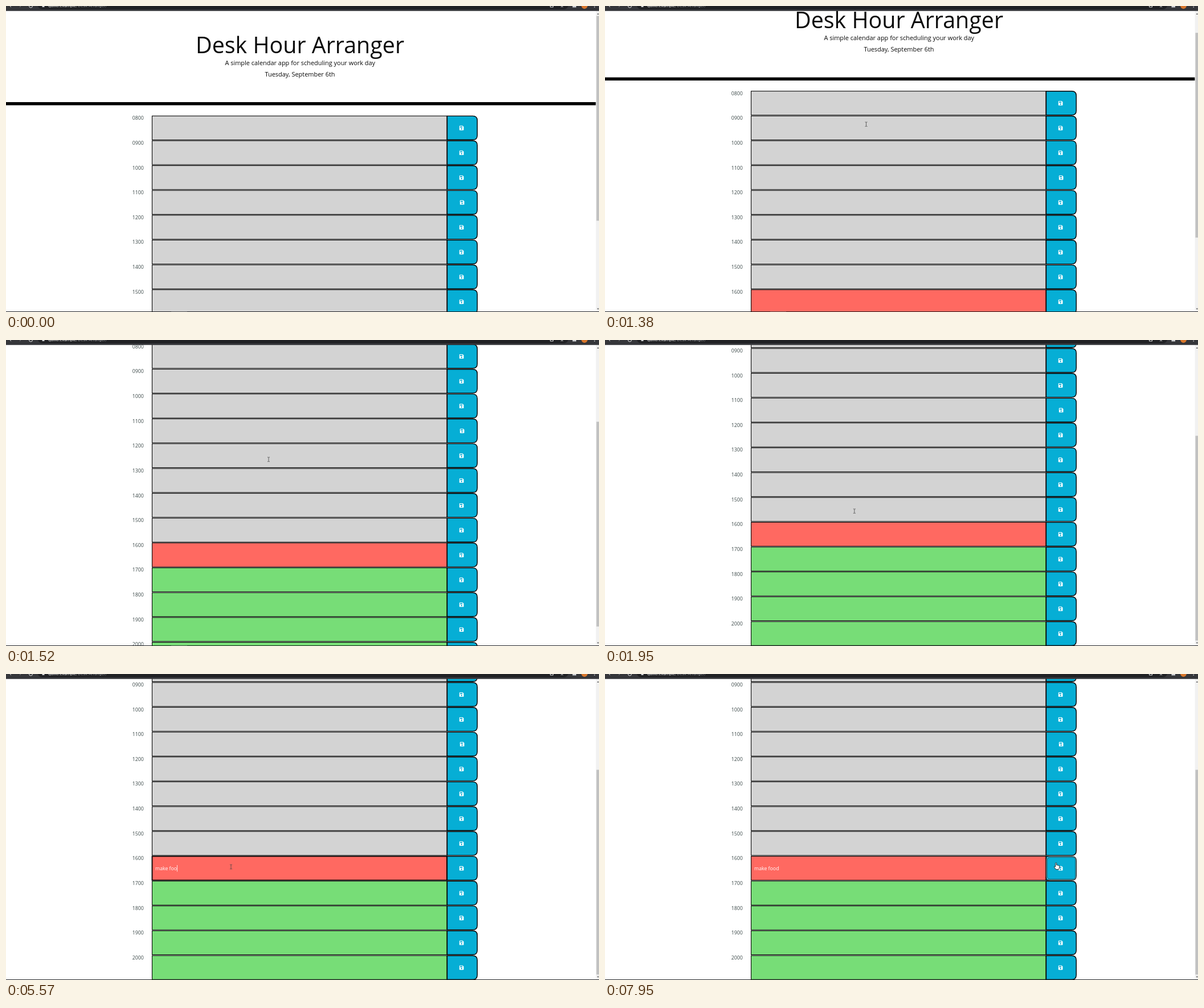
These frames come from a looping animation (1041 by 538 pixels, 8 s). An HTML page:

```html
<!DOCTYPE html>
<html lang="en">
<head>
<meta charset="utf-8">
<title>Day planner</title>
<style>
  html, body { margin: 0; width: 100%; height: 100%; overflow: hidden; background: #fff; }
  svg { display: block; width: 1041px; height: 538px; font: 8.75px "Open Sans", sans-serif; }
  .head { text-anchor: middle; fill: #0a0a0a; }
  .label { fill: #3b4848; }
  .field, .save { stroke: #000; }
  .field { stroke-width: 1.05; }
  .save { fill: #06aed5; stroke-width: 1.4; }
  #entry { fill: #fff; white-space: pre; }
  .url { font: 7.6px Roboto, sans-serif; }
</style>
</head>
<body>
<svg viewBox="0 0 1041 538">
  <defs>
    <g id="disk">
      <path fill="#fff" d="M-3.8-3Q-3.8-3.9-2.9-3.9H2L3.8-2.1V3Q3.8 3.9 2.9 3.9H-2.9Q-3.8 3.9-3.8 3Z"/>
      <path fill="#06aed5" d="M-2.7-2.8H1.5V-.8H-2.7Z"/>
      <circle cy="1.5" r="1.2" fill="#06aed5"/>
    </g>
  </defs>

  <g id="page">
    <g class="head">
      <text x="516" y="83" font-size="39.4">Desk Hour Arranger</text>
      <text x="516.3" y="104" font-size="10.94">A simple calendar app for scheduling your work day</text>
      <text x="516" y="123.8" font-size="10.94">Tuesday, September 6th</text>
    </g>
    <path d="M0 169H1035.6V174.5H0Z"/>
    <g id="rows"></g>
    <text id="entry" x="262" y="566.9"></text>
    <path id="caret" d="M0 558V569.5" stroke="#fff" stroke-width=".8"/>
    <g id="buttonFocus" fill="none">
      <rect x="776" y="544" width="50" height="39" rx="5" stroke="#000" stroke-width=".7"/>
      <rect x="775.2" y="543.2" width="51.4" height="40.6" rx="6" stroke="#d8f3fa" stroke-width=".6"/>
    </g>
  </g>

  <path fill="#f1f1f1" d="M1035.6 9H1041V538H1035.6Z"/>
  <rect id="thumb" x="1036.5" y="17.5" width="4.5" height="360" fill="#c1c1c1"/>
  <path fill="#666" d="M1037.5 15L1039.3 12.5L1041 15ZM1037.5 531.5H1041L1039.3 534Z"/>

  <g id="browserBar">
    <path fill="#35363a" d="M0 0H1041V8.7H0Z"/>
    <path fill="#202124" d="M56 0H987Q985 5.8 979 5.8H64Q58 5.8 56 0Z"/>
    <g fill="none" stroke="#e4e5e7" stroke-width="1">
      <path d="M6-1L9 2M40.5 0A3 3 0 0 0 46.5 0M955.5-1V2H960.5V-1M974 2L976 .5L978 2"/>
      <path d="M24 2L27-1" stroke="#85878b"/>
    </g>
    <path fill="#d0d2d5" d="M63.5 0H67.5V2H63.5ZM994.5 0H1001V2.5H994.5ZM1032.5 1H1034V2.5H1032.5Z"/>
    <circle cx="1015.5" cy="-.5" r="5.4" fill="#d9772b"/>
    <text class="url" x="74" y="1.6" fill="#f1f1f1">quillo.example<tspan fill="#9a9ca0">/Desk-Arranger/</tspan></text>
  </g>
  <path fill="#202124" d="M0 537H1041V538H0Z"/>
  <path id="taskHint" fill="#4a4a4c" d="M290 537H318V538H290Z"/>

  <g id="pointer">
    <path id="beam" fill="none" stroke="#444" stroke-width=".8" d="M-2-3.8H-.5L0-3.3L.5-3.8H2M0-3.3V3.3M-2 3.8H-.5L0 3.3L.5 3.8H2"/>
    <path id="arrow" fill="#fff" stroke="#000" stroke-width=".7" d="M0 0V10L2.3 7.8L3.9 11.2L5.4 10.5L3.9 7.2H7Z"/>
    <path id="hand" fill="#fff" stroke="#000" stroke-width=".8" stroke-linejoin="round"
      d="M-1 .8Q0-.7 1 .8V4.5Q2 3.5 2.8 4.8Q3.8 4 4.5 5.3Q6 4.8 6 6.4V8.5L4.8 12H-.2L-3.2 7.6Q-3.2 6.2-1.9 6.6L-1 7.5Z"/>
  </g>
</svg>

<script>
const LOOP = 8000, ROW_PITCH = 43.65, MAX_SCROLL = 222;
const $ = id => document.getElementById(id);
const show = (id, on) => $(id).setAttribute("visibility", on ? "visible" : "hidden");

// Past hours are grey, the current hour red, later hours green.
$("rows").innerHTML = Array.from({ length: 13 }, (_, i) => {
  const color = i < 8 ? "#d3d3d3" : i === 8 ? "#ff6961" : "#77dd77";
  const hour = String(8 + i).padStart(2, "0") + "00";
  return `<g transform="translate(0 ${193 + i * ROW_PITCH})">
    <text class="label" x="221.7" y="7.2">${hour}</text>
    <rect class="field" id="field${i}" x="256.5" y=".3" width="517.5" height="42.1" fill="${color}"/>
    <path class="save" d="M774.5 .4H819.5Q827.3 .4 827.3 8.2V34.5Q827.3 42.3 819.5 42.3H774.5Z"/>
    <use href="#disk" x="${i === 3 ? 800.7 : 799.7}" y="21.5"/>
  </g>`;
}).join("");

// [time, typed text, caret visible]
const typing = [
  [0, "", false], [2370, "", true], [2900, "", false], [3430, "", true],
  [3610, "m", true], [3690, "ma", true], [3960, "mak", true], [4230, "make", true],
  [4510, "make ", true], [4840, "make f", true], [5300, "make fo", true],
  [5570, "make foo", true], [6100, "make foo", false], [6170, "make food", true],
  [6700, "make food", false]
];

// [time, x, y]
const pointerPath = [
  [50, 1012, 530], [300, 900, 290], [620, 640, 52], [890, 500, 130], [1240, 456, 207.7],
  [1310, 456, 207.7], [1450, 461, 208], [1670, 461, 214], [1950, 437, 304],
  [2200, 411, 324], [2360, 395, 339], [6690, 395, 339], [6910, 822, 368],
  [7110, 820, 362], [7530, 796, 330], [7740, 794, 329], [7940, 791, 332.5]
];

function pointerAt(t) {
  const next = pointerPath.findIndex(p => p[0] > t);
  if (next < 0) return pointerPath.at(-1).slice(1);
  if (next === 0) return [1060, 560];
  const [t0, x0, y0] = pointerPath[next - 1], [t1, x1, y1] = pointerPath[next];
  const k = (t - t0) / (t1 - t0);
  return [x0 + (x1 - x0) * k, y0 + (y1 - y0) * k];
}

function scrollAt(t) {
  const p = Math.min(1, Math.max(0, (t - 1302) / 365));
  const smooth = p * p * (3 - 2 * p);
  return MAX_SCROLL * (1 - (1 - smooth) ** 1.75);
}

function draw(now) {
  const t = now % LOOP;
  const tick = Math.max(0, Math.floor((t + 20) / 70) * 70 - 20);
  const scroll = scrollAt(tick);
  $("page").setAttribute("transform", `translate(0 ${-scroll})`);
  $("thumb").setAttribute("y", 17.5 + scroll * .68);

  const [, text, caretOn] = typing.findLast(e => e[0] <= t);
  $("entry").textContent = text;
  const caretX = 262.4 + (text ? $("entry").getComputedTextLength() : 0);
  $("caret").setAttribute("transform", `translate(${caretX} 0)`);
  show("caret", caretOn);
  $("field8").style.strokeWidth = t >= 2370 && t < 7530 ? 1.8 : "";
  show("buttonFocus", t >= 7530);
  show("taskHint", t < 1740);

  const [x, y] = pointerAt(tick);
  const inRows = y + scroll > 193 && y > 9;
  const overField = inRows && x > 256 && x < 774;
  const overButton = inRows && x >= 774 && x < 828;
  $("pointer").setAttribute("transform", `translate(${x} ${y})`);
  show("beam", overField);
  show("hand", overButton);
  show("arrow", !overField && !overButton);
  requestAnimationFrame(draw);
}
draw(performance.now());
</script>
</body>
</html>
```
